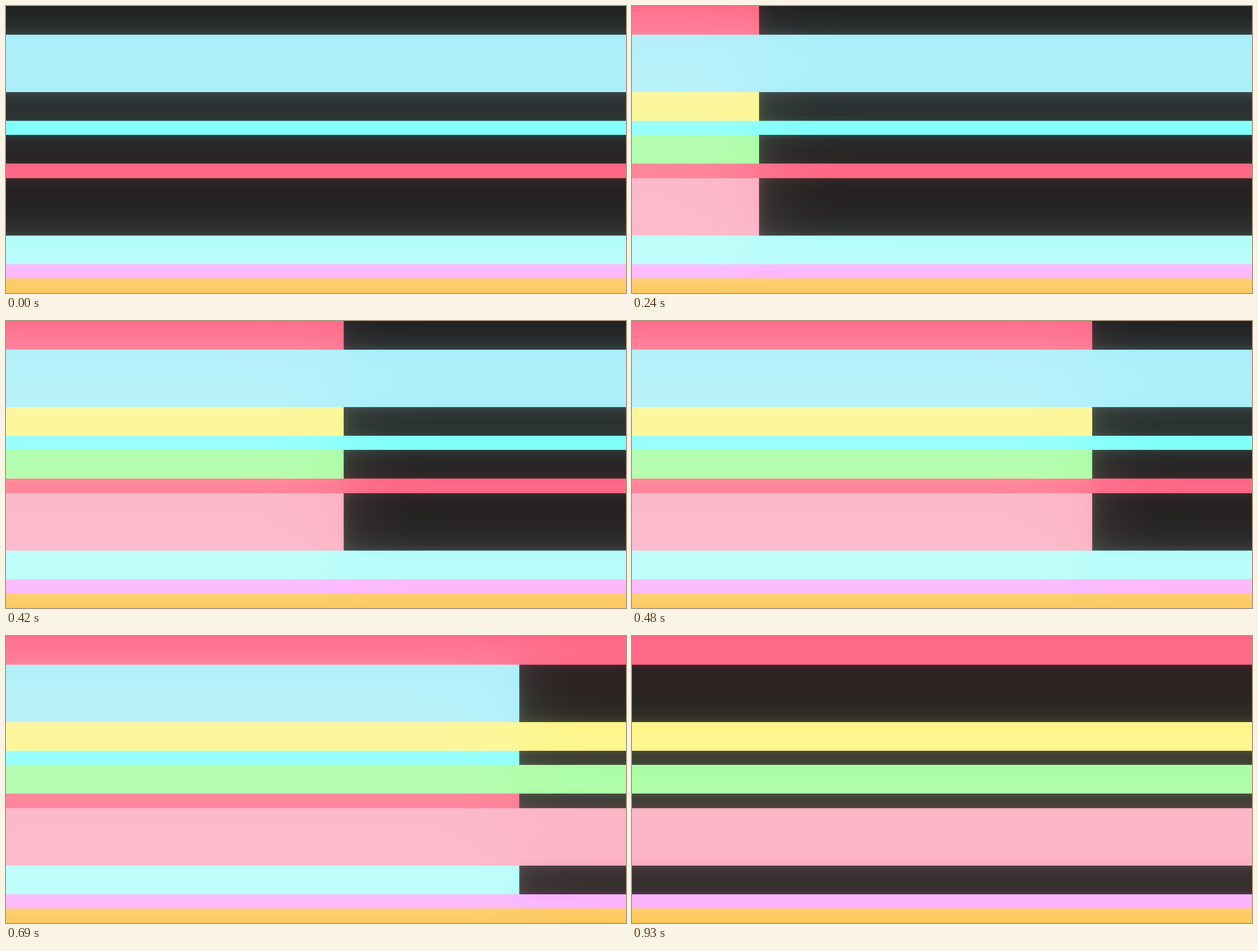
An HTML page with a canvas that plays this animation: 1098 by 510 pixels, repeating every 1.09 s.

```html
<!DOCTYPE html>
<html lang="en">
<head>
<meta charset="utf-8">
<title>Glowing bars</title>
<style>
  html, body { margin: 0; width: 100%; height: 100%; overflow: hidden; background: #191817; }
  canvas { display: block; }
</style>
</head>
<body>
<canvas id="stage" width="1098" height="510"></canvas>
<script>
(() => {
  const W = 1098, H = 510, UNIT = 25.5, LOOP = 1090, STEP = 30;
  const ctx = document.getElementById('stage').getContext('2d');
  const image = ctx.createImageData(W, H);
  const px = image.data;
  px.fill(255);

  const DARK = [25, 24, 23].map(v => v / 255);
  // Blur radius and strength of each glow layer
  const GLOW = [[5, 0.09], [16, 0.09], [60, 0.23]];

  // Height in units, group, colour at rest
  const bars = [
    [2, 'B', 255, 108, 138],
    [4, 'A', 174, 240, 250],
    [2, 'B', 252, 246, 140],
    [1, 'A', 130, 255, 251],
    [2, 'B', 174, 253, 168],
    [1, 'A', 255, 104, 134],
    [4, 'B', 252, 181, 200],
    [2, 'A', 183, 253, 250],
    [1, 'AB', 251, 180, 252],
    [1, 'AB', 253, 202, 98]
  ].map(([size, group, ...rgb]) => ({ size, group, rgb: rgb.map(v => v / 255) }));

  let offset = 0;
  for (const bar of bars) {
    bar.y0 = offset;
    offset += bar.size * UNIT;
    bar.y1 = offset;
  }

  const clamp = v => Math.min(1, Math.max(0, v));
  const cdf = z => 1 / (1 + Math.exp(-z * (1.5976 + 0.07056 * z * z)));
  const isLit = (bar, groups) => [...bar.group].some(g => groups.includes(g));

  // Glow of one layer at height y when the given groups shine
  function glowAt(y, groups, [radius, power]) {
    const sum = [0, 0, 0];
    for (const bar of bars) {
      if (!isLit(bar, groups)) continue;
      const share = power * (cdf((bar.y1 - y) / radius) - cdf((bar.y0 - y) / radius));
      bar.rgb.forEach((v, c) => { sum[c] += share * v; });
    }
    return sum;
  }

  // Surface colour that reaches the rest colour once the glow is screened on
  for (const bar of bars) {
    const mid = (bar.y0 + bar.y1) / 2;
    const layers = GLOW.map(layer => glowAt(mid, bar.group.slice(-1), layer));
    bar.base = bar.rgb.map((v, c) => {
      const light = layers.reduce((sum, layer) => sum + layer[c], 0);
      return clamp((v - light) / (1 - light));
    });
  }

  function makeProfile(groups) {
    return Array.from({ length: H }, (_, y) => {
      const bar = bars.find(b => y < Math.floor(b.y1));
      return {
        base: isLit(bar, groups) ? bar.base : DARK,
        glow: GLOW.map(layer => glowAt(y + 0.5, groups, layer))
      };
    });
  }
  const profiles = { A: makeProfile('A'), B: makeProfile('B'), AB: makeProfile('AB') };

  // Everything shines left of the edge, one group right of it
  function draw(edge, group) {
    const [m0, m1, m2] = GLOW.map(([radius]) => Float32Array.from({ length: W }, (_, x) =>
      edge <= 0 ? 0 : edge >= W ? 1 : cdf((edge - x - 0.5) / radius)));
    const split = Math.round(edge);
    for (let y = 0; y < H; y++) {
      const left = profiles.AB[y], right = profiles[group][y];
      for (let c = 0; c < 3; c++) {
        const [r0, r1, r2] = right.glow.map(g => g[c]);
        const [d0, d1, d2] = left.glow.map((g, i) => g[c] - right.glow[i][c]);
        const rest = r0 + r1 + r2, lb = left.base[c], rb = right.base[c];
        for (let x = 0, i = y * W * 4 + c; x < W; x++, i += 4) {
          const light = rest + d0 * m0[x] + d1 * m1[x] + d2 * m2[x];
          const base = x < split ? lb : rb;
          px[i] = 255 * (base + light * (1 - base));
        }
      }
    }
    ctx.putImageData(image, 0, 0);
  }

  const grow = u => u * (0.583 + u * (-0.64 + u * 1.057));
  const shrink = u => u * (0.671 + u * (-0.327 + u * 0.656));

  let shown = -1;
  function render() {
    const t = Math.floor((performance.now() + 0.5) % LOOP / STEP) * STEP;
    const growing = t < 600;
    const u = growing ? clamp((t - 30) / 510) : clamp((t - 600) / 330);
    const key = growing ? u : 2 + u;
    if (key !== shown) {
      shown = key;
      if (growing) draw(W * clamp(grow(u)), 'A');
      else draw(W * (1 - clamp(shrink(u))), 'B');
    }
    requestAnimationFrame(render);
  }
  render();
})();
</script>
</body>
</html>
```
